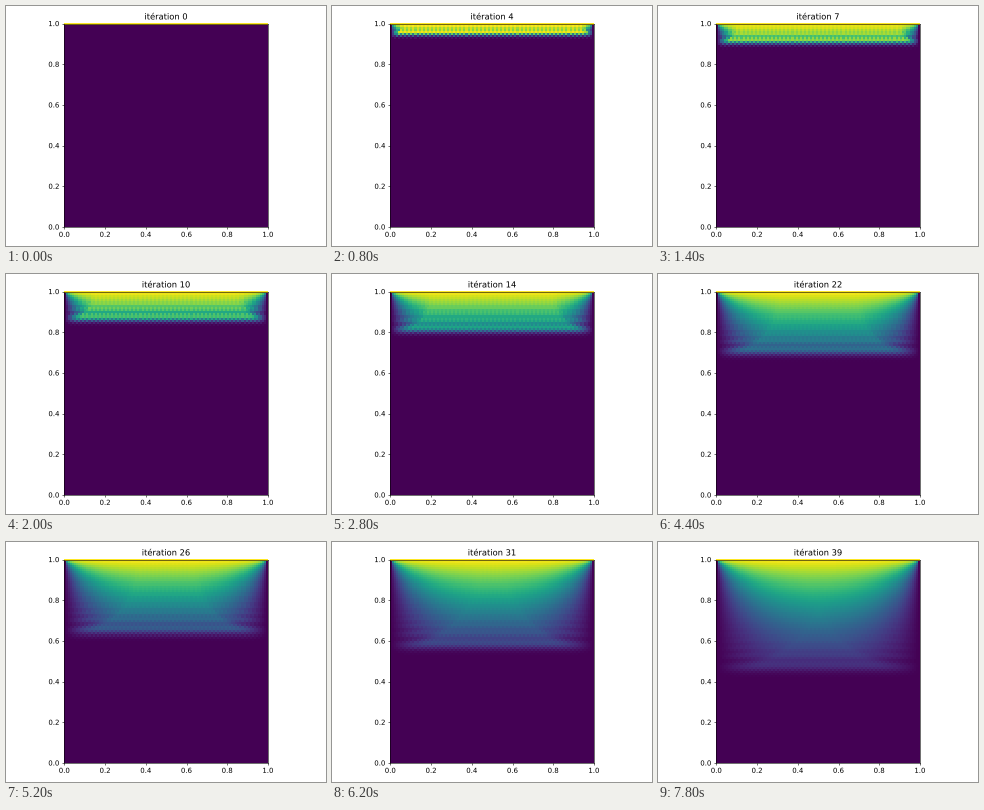
A matplotlib script for the animation above (8000 ms loop, 320 by 240 pixels).

```python
import numpy as np
import matplotlib.pyplot as plt
from matplotlib.animation import FuncAnimation
from matplotlib.patheffects import Normal

N = 100          # grid points per side
STEPS = 40
OMEGA = 2 / (1 + np.sin(np.pi / N))
W, H = 320, 240
LEFT, RIGHT, BOTTOM, TOP = 58.4, 262, 19, 222.4   # axes box in pixels

rows, cols = np.indices((N, N))
inside = (rows > 0) & (rows < N - 1) & (cols > 0) & (cols < N - 1)
colours = [inside & ((rows + cols) % 2 == p) for p in (0, 1)]


def relax(u):
    """One red-black over-relaxation sweep of Laplace's equation."""
    u = u.copy()
    for mask in colours:
        mean = np.zeros_like(u)
        mean[1:-1, 1:-1] = (u[:-2, 1:-1] + u[2:, 1:-1]
                            + u[1:-1, :-2] + u[1:-1, 2:]) / 4
        u[mask] += OMEGA * (mean - u)[mask]
    return u


field = np.zeros((N, N))
field[0] = 1     # hot top edge, the other sides stay at zero
fields = [field]
while len(fields) < STEPS:
    fields.append(relax(fields[-1]))

plt.rcParams["font.family"] = "DejaVu Sans"
fig = plt.figure(figsize=(6.4, 4.8), dpi=50)
ax = fig.add_axes([LEFT / W, BOTTOM / H, (RIGHT - LEFT) / W, (TOP - BOTTOM) / H])
image = ax.imshow(fields[0], extent=(0, 1, 0, 1), cmap="viridis",
                  vmin=0, vmax=1, aspect="auto", interpolation="nearest")
image.set_clip_on(False)
ticks = np.linspace(0, 1, 6)
ax.set_xticks(ticks)
ax.set_yticks(ticks)
title = ax.set_title("itération 0")

# Outline text keeps its sub-pixel position.
for text in [title, *ax.get_xticklabels(), *ax.get_yticklabels()]:
    text.set_path_effects([Normal()])


def update(k):
    image.set_data(fields[k])
    title.set_text(f"itération {k}")
    return image, title


anim = FuncAnimation(fig, update, frames=STEPS, interval=200,
                     repeat=True, repeat_delay=0, blit=False)
plt.show()
```
